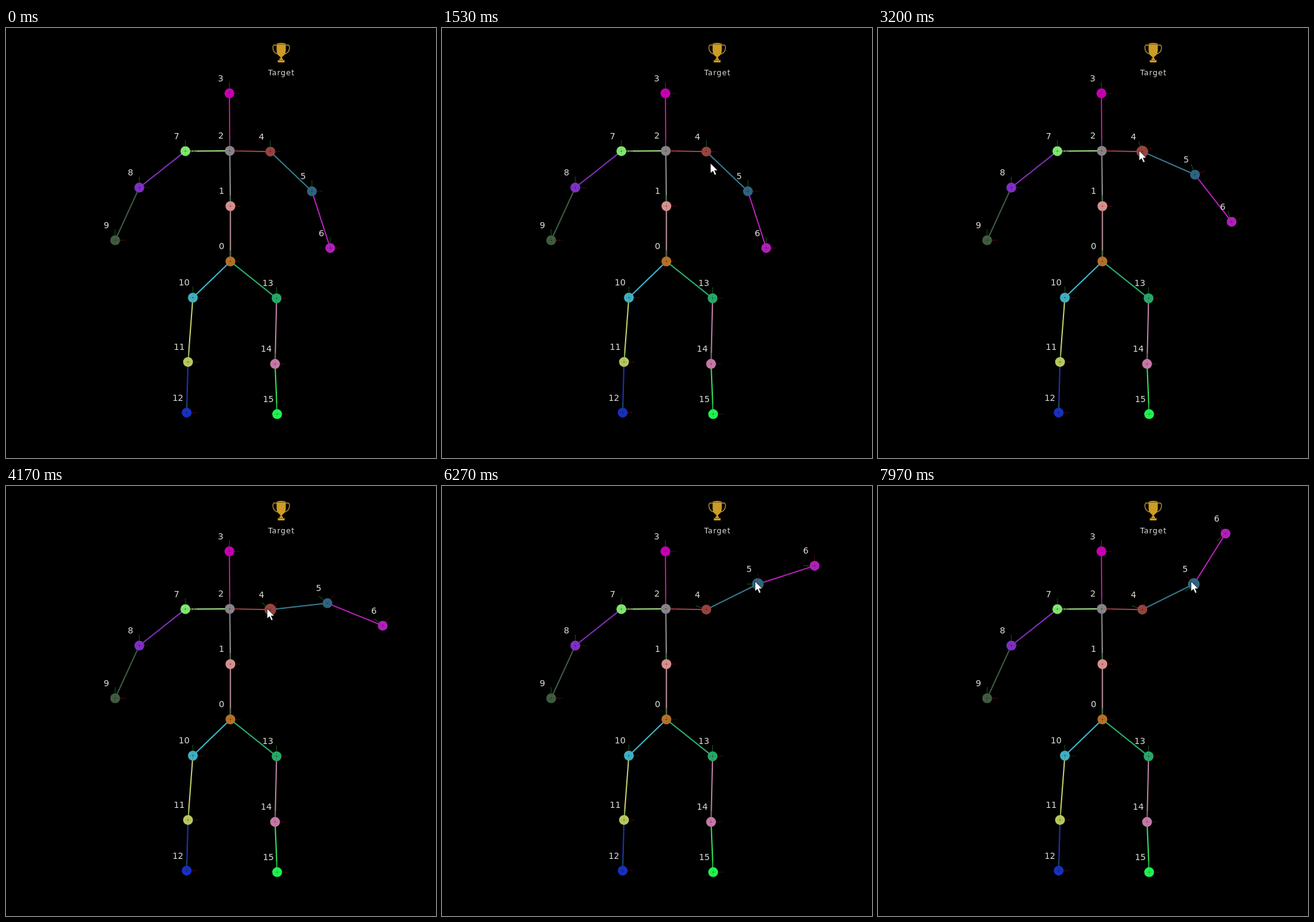
These frames come from a looping animation (700x700 px, 8000 ms). An HTML page:

```html
<!DOCTYPE html>
<html lang="en">
<head>
<meta charset="utf-8">
<title>Skeleton joints</title>
<style>
  html, body { margin: 0; width: 100%; height: 100%; overflow: hidden; background: #000; }
  svg { display: block; width: 100vw; height: 100vh; }
  text { font-family: "DejaVu Sans", sans-serif; font-size: 14px; fill: #dcdcd4; text-anchor: middle; }
  .caption { font-size: 12px; letter-spacing: 1.1px; }
</style>
</head>
<body>
<svg id="stage" viewBox="0 0 700 700">
  <g id="trophy">
    <g fill="none" stroke="#bc9430" stroke-width="1.4">
      <path d="M440.500 28.500C436 26 434 29 434.500 33C435 38 438 41.500 443 42.500"/>
      <path d="M455.500 28.500C460 26 462 29 461.500 33C461 38 458 41.500 453 42.500"/>
    </g>
    <path fill="#cc9c24" d="M440.500 25.500Q448 23 455.500 25.500V36Q455.500 43.500 449.500 47V50H451V52H453.500V56H442.500V52H445V50H446.500V47Q440.500 43.500 440.500 36Z"/>
    <path stroke="#7c5808" d="M441 26.500H455M443 52.500H453"/>
  </g>
  <text class="caption" x="448.500" y="77.300">Target</text>
  <g id="bones"></g>
  <g id="joints"></g>
  <path id="cursor" d="M0 0V16.500L4 13L6.800 19.500L9.600 18.300L6.800 12H12Z" fill="#fff" stroke="#000" stroke-width=".8"/>
</svg>
<script>
const LOOP = 8000;
const NS = "http://www.w3.org/2000/svg";
const $ = id => document.getElementById(id);

// x, y, parent, joint colour, bone colour
const joints = [
  [365.3, 380, -1, "#b87028"],
  [365.3, 290, 0, "#d89090", "#bc9098"],
  [364.3, 200, 1, "#888488", "#948c94"],
  [363.7, 106.3, 2, "#c800b4", "#bc1c90"],
  [430.3, 201.2, 2, "#984440", "#a04450"],
  [498, 265.8, 4, "#306480", "#387c90"],
  [527.8, 358.2, 5, "#b020b8", "#bc20bc"],
  [292, 200.4, 2, "#80e870", "#a0e488"],
  [217, 259.8, 7, "#8030c4", "#8430bc"],
  [177.7, 345.5, 8, "#405c40", "#405c44"],
  [304.2, 439, 0, "#40b0c0", "#40b8cc"],
  [296.3, 543.7, 10, "#b8c860", "#c8d06c"],
  [294.1, 626.2, 11, "#1830c0", "#1c34b4"],
  [440.5, 440, 0, "#28a868", "#28b870"],
  [438, 546.8, 13, "#c878a8", "#c080a8"],
  [441.4, 628.6, 14, "#20f450", "#30e45c"]
].map(([x, y, parent, color, bone]) => ({ x, y, parent, color, bone }));

// Each entry turns the joint by another ten degrees.
const turns = {
  4: [2600, 2940, 3270, 3600, 3930, 4260, 4570],
  5: [5810, 6120, 6710, 7020, 7320, 7680]
};

// time, x, y
const track = [
  [500, 641, 432], [840, 594, 384], [1160, 510, 298], [1450, 437, 220],
  [1620, 437, 220], [1900, 425, 199.5], [4720, 425, 199.5],
  [5070, 533, 156.5], [5220, 533, 156.5], [5500, 509.5, 155]
];

function add(parent, tag, attrs) {
  const el = document.createElementNS(NS, tag);
  set(el, attrs);
  return parent.appendChild(el);
}

function set(el, attrs) {
  for (const key in attrs) el.setAttribute(key, attrs[key]);
}

joints.forEach((j, i) => {
  if (j.bone) j.line = add($("bones"), "line", { stroke: j.bone, "stroke-width": 2 });
  j.group = add($("joints"), "g", {});
  j.disc = add(j.group, "circle", { fill: j.color });
  j.axes = add(j.group, "g", { fill: "none" });
  add(j.axes, "path", { d: "M0 -8V-18", stroke: "#10601c" });
  add(j.axes, "path", { d: "M8 0H18", stroke: "#700c10", "stroke-dasharray": "3 1.500" });
  add(j.axes, "path", { d: "M-6 0H6M0 -6V6", stroke: "#000", "stroke-opacity": .1 });
  add(j.axes, "path", { d: "M-.8 0H.8", stroke: "#000", "stroke-width": 1.6, "stroke-opacity": .5 });
  j.label = add(j.group, "text", { x: -14.3, y: -19.7 });
  j.label.textContent = i;
});

function cursorAt(t) {
  if (t < track[0][0]) return null;
  const next = track.findIndex(p => p[0] > t);
  if (next < 0) return track.at(-1).slice(1);
  const [t0, x0, y0] = track[next - 1];
  const [t1, x1, y1] = track[next];
  const k = (t - t0) / (t1 - t0);
  return [x0 + (x1 - x0) * k, y0 + (y1 - y0) * k];
}

function pose(t) {
  const placed = [];
  joints.forEach((j, i) => {
    const turn = 10 * (turns[i] || []).filter(at => t >= at).length;
    if (j.parent < 0) {
      placed.push({ x: j.x, y: j.y, angle: turn });
      return;
    }
    const rest = joints[j.parent], p = placed[j.parent];
    const a = -p.angle * Math.PI / 180;
    const dx = j.x - rest.x, dy = j.y - rest.y;
    placed.push({
      x: p.x + dx * Math.cos(a) - dy * Math.sin(a),
      y: p.y + dx * Math.sin(a) + dy * Math.cos(a),
      angle: p.angle + turn
    });
  });
  return placed;
}

function draw(t) {
  const placed = pose(t), mouse = cursorAt(t);
  joints.forEach((j, i) => {
    const { x, y, angle } = placed[i];
    const hover = mouse && Math.hypot(mouse[0] - x, mouse[1] - y) < 9;
    set(j.group, { transform: `translate(${x} ${y})` });
    set(j.axes, { transform: `rotate(${-angle})` });
    set(j.disc, { r: hover ? 9.6 : 8 });
    if (j.line) {
      const p = placed[j.parent];
      set(j.line, { x1: p.x, y1: p.y, x2: x, y2: y });
    }
  });
  set($("cursor"), mouse
    ? { visibility: "visible", transform: `translate(${mouse[0]} ${mouse[1]})` }
    : { visibility: "hidden" });
}

const start = performance.now();
function tick(now) {
  draw(Math.max(0, now - start) % LOOP);
  requestAnimationFrame(tick);
}
draw(0);
requestAnimationFrame(tick);
</script>
</body>
</html>
```
